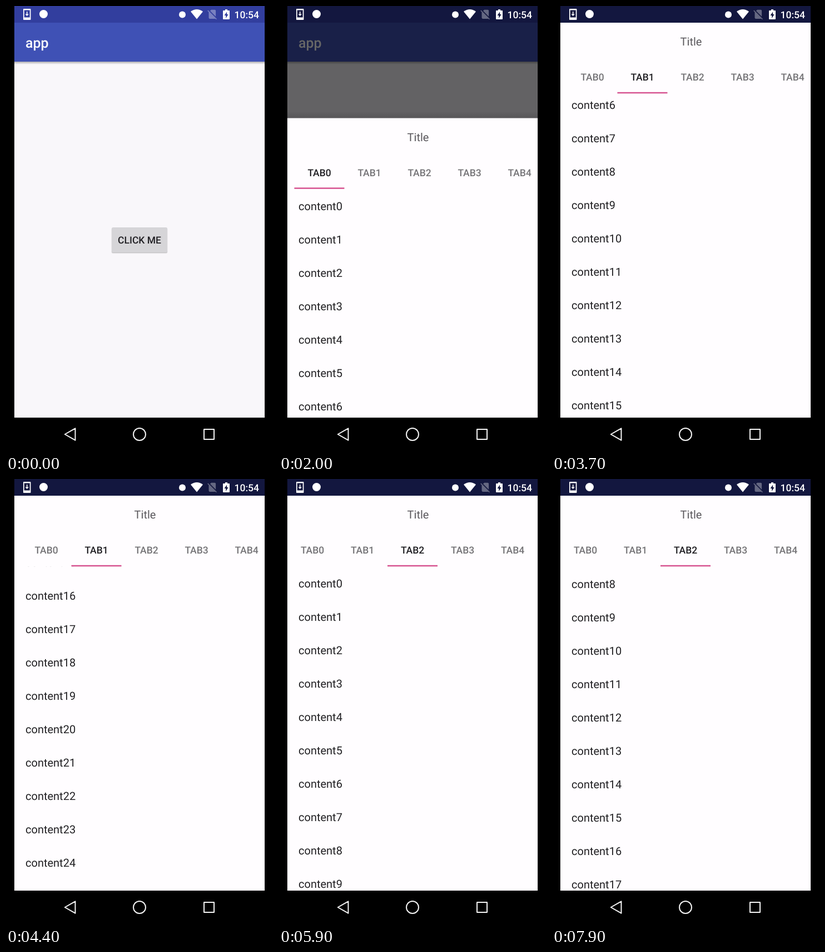
An HTML page for the animation above (8000 ms loop, 480 px wide and 800 px high).

```html
<!DOCTYPE html>
<html lang="en">
<head>
<meta charset="utf-8">
<title>Bottom sheet with tabs</title>
<style>
  html, body { margin: 0; width: 100%; height: 100%; overflow: hidden; background: #000; }
  svg { display: block; width: 100%; height: 100%; font: 20px Roboto, sans-serif; text-rendering: geometricPrecision; }
  .medium { font-size: 17.5px; font-weight: 500; }
  .mid { text-anchor: middle; }
  .end { text-anchor: end; }
  .row { fill: #222124; }
  .tab { fill: #757477; }
  .tab.on { fill: #201f23; }
</style>
</head>
<body>
<svg viewBox="0 0 480 800">
  <defs>
    <clipPath id="screen"><rect x="15" width="450" height="740"/></clipPath>
    <clipPath id="listArea"><rect x="15" y="157.5" width="450" height="582.5"/></clipPath>
    <linearGradient id="fall" x2="0" y2="1">
      <stop stop-opacity=".3"/><stop offset="1" stop-opacity="0"/>
    </linearGradient>
    <linearGradient id="rise" x2="0" y2="1">
      <stop stop-opacity="0"/><stop offset="1" stop-opacity=".12"/>
    </linearGradient>
  </defs>
  <rect width="480" height="800"/>

  <g clip-path="url(#screen)">
    <rect x="15" width="450" height="740" fill="#f9f7fa"/>
    <rect x="15" y="100" width="450" height="5" fill="url(#fall)"/>
    <rect x="15" y="30" width="450" height="70" fill="#3f51b5"/>
    <rect x="15" width="450" height="30" fill="#323e9e"/>
    <text x="35" y="74.8" fill="#fff" style="font-size:25px;font-weight:500">app</text>
    <rect x="189.5" y="399" width="101" height="46" rx="3" opacity=".08"/>
    <rect x="190" y="399" width="100" height="45" rx="2.5" opacity=".15"/>
    <rect id="button" x="190" y="398" width="100" height="45" rx="2.5" fill="#d6d5d8"/>
    <text class="medium mid" x="240" y="427.3" fill="#201f23">CLICK ME</text>
    <rect id="dim" x="15" width="450" height="740"/>

    <g id="sheet">
      <rect x="15" y="18" width="450" height="12" fill="url(#rise)"/>
      <rect x="15" y="30" width="450" height="770" fill="#fffdff"/>
      <text class="mid" x="250" y="71.2" fill="#59575b">Title</text>
      <g id="tabs">
        <rect id="indicator" x="27.5" y="154.8" width="90" height="2.5" fill="#d65390"/>
      </g>
      <g id="lists" clip-path="url(#listArea)"></g>
      <g clip-path="url(#listArea)">
        <circle id="glow" cx="240" cy="-584.6" r="675" fill="#3f51b5"/>
      </g>
    </g>
    <rect id="statusCover" x="15" width="450" height="30" fill="#13173f"/>
  </g>

  <g fill="#fff">
    <path fill-rule="evenodd" d="M32 5H43.500Q44.500 5 44.500 6V24Q44.500 25 43.500 25H32Q31 25 31 24V6Q31 5 32 5ZM32.700 7.500V20.500H42.800V7.500Z"/>
    <path d="M37 10H38.500V14.500H41L37.750 18L34.500 14.500H37Z"/>
    <circle cx="67.500" cy="14.500" r="7.500"/>
    <circle cx="317" cy="15.500" r="6"/>
    <path d="M343 23.500L332 10Q343 2 354 10Z"/>
    <path opacity=".35" transform="translate(360 4) scale(.9)" d="M19 5Q19 3 17 3H10L7.660 5.340L19 16.680ZM3.650 3.880L2.380 5.150L5 7.770V19Q5 21 7 21H17L18 20.740L19.850 22.620L21.120 21.350Z"/>
    <path fill-rule="evenodd" d="M394 6H398V8H401Q402 8 402 9V23Q402 24 401 24H391Q390 24 390 23V9Q390 8 391 8H394ZM397 10.500L392.500 17H395.200V22L399.600 15H397Z"/>
    <text class="medium end" x="455" y="21.9">10:54</text>
  </g>
  <g fill="none" stroke="#f4f4f4" stroke-width="2" stroke-linejoin="round">
    <path d="M105.800 770L124.500 759.300V780.700Z"/>
    <circle cx="240" cy="770" r="11"/>
    <rect x="356" y="761" width="18" height="18"/>
  </g>
</svg>
<script>
const LOOP = 8000, STEP = 100;
const PAGE = 450, ROW = 60, TAB = 90;
const LIST_END = 30 * ROW - 582.5;
const $ = id => document.getElementById(id);

const linear = p => p;
const speedUp = p => p * p;
const slowDown = p => p * (2 - p);
const drag = p => 1 - (1 - p) ** 1.35;
const smooth = p => p * p * (3 - 2 * p);

// Runs from one value through moves of the form [start, end, target, easing].
function path(from, ...moves) {
  return t => {
    let value = from;
    for (const [start, end, target, ease] of moves) {
      const p = Math.min(1, Math.max(0, (t - start) / (end - start)));
      value += (target - value) * ease(p);
    }
    return value;
  };
}

const dimAt = path(0, [600, 900, .6, linear]);
const fadeAt = path(0, [600, 900, 1, speedUp]);
const topAt = path(425, [600, 900, 283, speedUp], [1900, 2300, 30, drag]);
const pageAt = path(0, [2900, 3215, 1, smooth], [5500, 5850, 2, smooth]);
const glowAt = path(0, [6700, 6800, .94, linear], [6800, 7400, 0, slowDown]);
const scrollAt = [
  path(0),
  path(0, [3500, 4400, 938.5, slowDown], [4400, 5100, 0, smooth]),
  path(0, [6100, 6750, LIST_END, linear], [7000, 7900, 479, slowDown])
];

function add(parent, tag, attrs, text = '') {
  const el = document.createElementNS('http://www.w3.org/2000/svg', tag);
  for (const key in attrs) el.setAttribute(key, attrs[key]);
  el.textContent = text;
  return parent.appendChild(el);
}

const tabs = Array.from({ length: 5 }, (_, i) =>
  add($('tabs'), 'text', { class: 'tab medium mid', x: 72.5 + TAB * i, y: 134.4 }, 'TAB' + i));

const lists = scrollAt.map(() => {
  const list = add($('lists'), 'g', {});
  for (let i = 0; i < 30; i++)
    add(list, 'text', { class: 'row', x: 35, y: 195.4 + ROW * i }, 'content' + i);
  return list;
});

const move = (el, x, y) => el.setAttribute('transform', `translate(${x} ${y})`);

function draw(t) {
  const dim = dimAt(t), page = pageAt(t), glow = glowAt(t);

  $('button').setAttribute('fill', t < 500 ? '#d6d5d8' : '#c6c5c8');
  $('dim').setAttribute('opacity', dim);
  $('statusCover').setAttribute('opacity', dim / .6);
  $('sheet').setAttribute('opacity', fadeAt(t));
  move($('sheet'), 0, topAt(t) - 30);

  // The indicator trails the pages slightly.
  const mark = pageAt(t - 26);
  const shift = Math.min(12.5, Math.max(0, 72.5 + TAB * mark - 240));
  move($('tabs'), -shift, 0);
  move($('indicator'), TAB * mark, 0);
  tabs.forEach((tab, i) => tab.classList.toggle('on', i === Math.round(page)));

  lists.forEach((list, i) => move(list, PAGE * (i - page), -scrollAt[i](t)));

  // The circle's top is 90.4 above its base line, so flip it to bulge upwards.
  $('glow').setAttribute('transform', `translate(0 740) scale(1 ${-glow})`);
  $('glow').setAttribute('opacity', Math.min(.275, glow * .3));
}

function frame() {
  const t = performance.now() % LOOP;
  draw(Math.floor(t / STEP) * STEP);
  requestAnimationFrame(frame);
}
frame();
</script>
</body>
</html>
```
